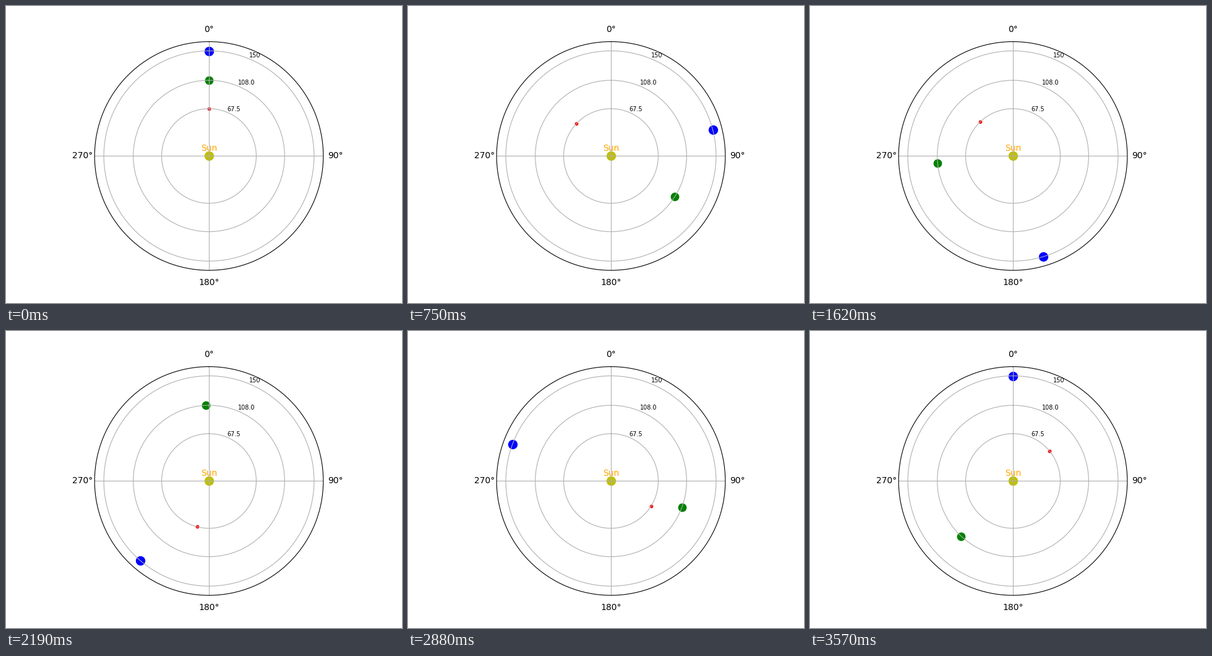
Recreate the animation shown at these times as a matplotlib script. Size 640 by 480 pixels, loop 3.6 s.

```python
import numpy as np
import matplotlib.pyplot as plt
from matplotlib.animation import FuncAnimation

FRAMES = 120
INTERVAL = 30

# orbit radius, turns per loop, marker area, colour
PLANETS = [
    (67.5, 4.14, 10, "r"),
    (108.0, 1.62, 80, "g"),
    (150.0, 1.0, 100, "b"),
]

fig = plt.figure(figsize=(6.4, 4.8), dpi=100)
ax = fig.add_subplot(projection="polar")
ax.set_theta_zero_location("N")
ax.set_theta_direction(-1)
ax.set_thetagrids(range(0, 360, 90))
ax.set_rgrids([p[0] for p in PLANETS], labels=["67.5", "108.0", "150"], fontsize=7)

ax.scatter(0, 0, s=100, c="y")
ax.annotate("Sun", (0, 0), xytext=(0, 6), textcoords="offset points",
            ha="center", color="orange")
dots = [ax.scatter(0, radius, s=size, c=color)
        for radius, _, size, color in PLANETS]
ax.set_rlim(0, 163.17)


def update(i):
    phase = 2 * np.pi * i / (FRAMES - 1)
    for dot, (radius, turns, _, _) in zip(dots, PLANETS):
        dot.set_offsets([(phase * turns, radius)])
    return dots


anim = FuncAnimation(fig, update, frames=FRAMES, interval=INTERVAL,
                     repeat=True, repeat_delay=0)
plt.show()
```
